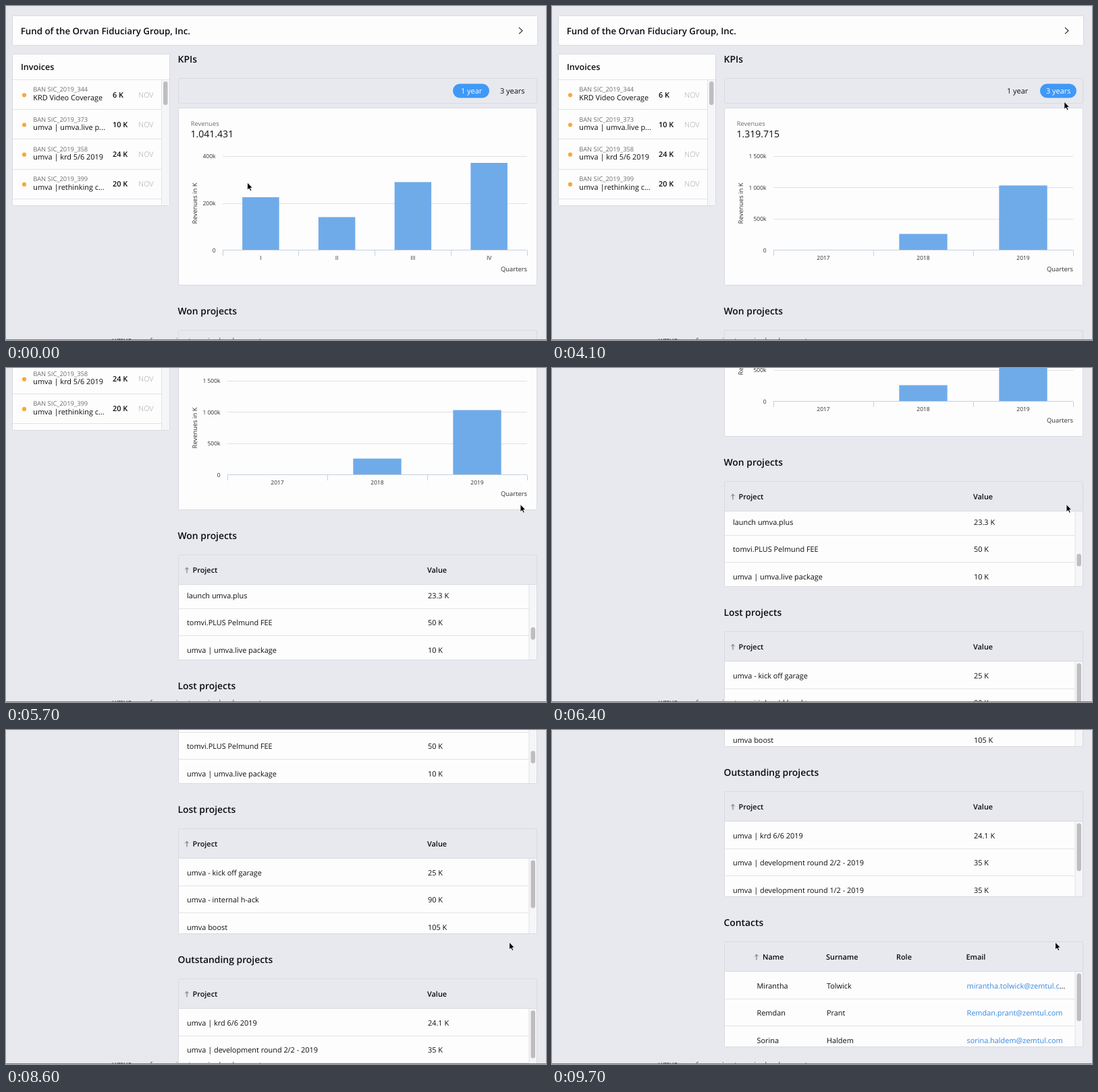
These frames come from a looping animation (800x496 px, 9.8 s). An HTML page:

```html
<!DOCTYPE html>
<html lang="en">
<head>
<meta charset="utf-8">
<title>Account dashboard</title>
<style>
  html, body { margin: 0; width: 100%; height: 100%; overflow: hidden; background: #e8e9ee; }
  #stage { display: block; }
  text { font: 10.9px "Open Sans", sans-serif; fill: #0c0c0f; white-space: pre; text-rendering: geometricPrecision; }
  .title { font-size: 13.3px; font-weight: 600; }
  .heading { font-size: 13.9px; font-weight: 600; }
  .bold { font-weight: 600; }
  .panelTitle { font-size: 12.6px; font-weight: 600; }
  .small { font-size: 9.4px; fill: #6c6d71; }
  .axisTitle { font-size: 9.4px; fill: #2e2f33; }
  .tick { font-size: 8.5px; fill: #2e2f33; }
  .total { font-size: 14px; }
  .month { font-weight: 300; fill: #a2a3a7; }
  .link { fill: #3588dd; }
  .on { fill: #fff; }
  .end { text-anchor: end; }
  .middle { text-anchor: middle; }
</style>
</head>
<body>
<svg id="stage" width="800" height="496" viewBox="0 0 800 496"></svg>
<script>
const LOOP = 9800, SWITCH = 3300, GROW = 800;
const BG = '#e8e9ee', WHITE = '#fefdfe', BORDER = '#d9dadf', BAR = '#6fabe9', AXIS = '#c3d0e0';

const text = (x, y, s, cls = '') => `<text x="${x}" y="${y}" class="${cls}">${s}</text>`;
const rect = (x, y, w, h, fill, extra = '') =>
  `<rect x="${x}" y="${y}" width="${w}" height="${h}" fill="${fill}" ${extra}/>`;
const line = (x1, y1, x2, y2, color = '#e1e2e6') =>
  `<path d="M${x1} ${y1}L${x2} ${y2}" stroke="${color}"/>`;
const panel = (x, y, w, h, fill = WHITE) => rect(x, y, w, h, fill, `rx="2" stroke="${BORDER}"`);
const clip = (x, y, w, h, content) => `<svg x="${x}" y="${y}" width="${w}" height="${h}">${content}</svg>`;
const each = (list, draw) => list.map(draw).join('');
const scrollbar = (x, y, h, thumbY, thumbH) =>
  rect(x, y, 12, h, '#f6f6f9') + line(x + .5, y, x + .5, y + h) +
  rect(x + 3, thumbY, 6.5, thumbH, '#bebdc0', 'rx="3.2"');

function invoices() {
  const rows = [
    ['344', 'KRD Video Coverage', '6 K'],
    ['373', 'umva | umva.live p...', '10 K'],
    ['358', 'umva | krd 5/6 2019', '24 K'],
    ['399', 'umva |rethinking c...', '20 K']
  ];
  return panel(9.5, 71.5, 233, 225) + text(22, 95, 'Invoices', 'panelTitle') + line(10, 109.5, 242, 109.5) +
    each(rows, ([id, name, amount], i) => {
      const y = 110 + 44.2 * i;
      return `<circle cx="27" cy="${y + 22.3}" r="3.1" fill="#f7a93b"/>` +
        text(40.3, y + 17.3, 'BAN SIC_2019_' + id, 'small') + text(40.3, y + 30, name) +
        text(158, y + 25.7, amount, 'bold') + text(196.3, y + 25.7, 'NOV', 'month') +
        line(10, Math.floor(y + 43.6) + .5, 230, Math.floor(y + 43.6) + .5);
    }) + scrollbar(230, 110, 186, 112, 35);
}

function filter(choice) {
  return rect(choice ? 723 : 662, 115.5, 54, 21, '#3f99f7', 'rx="10.5"') +
    text(674, 130, '1 year', choice ? '' : 'on') + text(732, 130, '3 years', choice ? 'on' : '');
}

function chart(left, total, ticks, names, heights, barWidth) {
  const base = 363, right = 772, step = (right - left) / names.length;
  const center = i => left + step * (i + .5);
  return text(273.5, 195.3, total, 'total') +
    each(ticks, (label, i) => {
      const y = base - 140 * i / (ticks.length - 1);
      return (i ? line(left, Math.floor(y) + .5, right, Math.floor(y) + .5, '#dfe0e3') : '') +
        text(left - 10.5, y + 3, label, 'tick end');
    }) +
    '<g class="bars">' + each(heights, (h, i) => rect(center(i) - barWidth / 2, base - h, barWidth, h, BAR)) + '</g>' +
    line(left, base - .5, right, base - .5, AXIS) +
    each([...names, ''], (name, i) => {
      const x = Math.floor(left + step * i) + .5;
      return line(x, base, x, base + 8, AXIS) + text(center(i), 377.3, name, 'tick middle');
    });
}

function table(index, title, columns, rows, arrowX, shift = 0, thumbY = 47.5, thumbH = 71) {
  const top = 481 + 223 * index;
  const cells = each(rows, (row, i) => {
    const y = 40.3 * i - shift;
    const divider = Math.floor(y + 40) + .5;
    return each(row, (cell, c) => cell && text(columns[c][1] - 255, y + 25, cell, cell.includes('@') ? 'link' : '')) +
      line(0, divider, 520, divider);
  });
  return text(254.5, top - 23, title, 'heading') + panel(255.5, top + .5, 531, 156, BG) +
    `<path d="M${arrowX} ${top + 27.5}v-8m-2.7 2.7l2.7 -2.7l2.7 2.7" fill="none" stroke="#55565a" stroke-width=".9"/>` +
    each(columns, ([name, , x]) => text(x, top + 27.3, name, 'bold')) +
    clip(256, top + 45, 530, 111, rect(0, 0, 530, 111, WHITE) + cells) +
    line(256, top + 44.5, 786, top + 44.5, BORDER) +
    scrollbar(774.5, top + 45, 111, top + thumbY, thumbH) +
    `<path d="M786.5 ${top + 1}v155.5H256" fill="none" stroke="${BORDER}"/>`;
}

// Columns: name, left edge of cells, left edge of the header
const projectColumns = [['Project', 267, 276.5], ['Value', 624, 624]];
const contactColumns = [['Name', 302.5, 312], ['Surname', 406, 406], ['Role', 510, 510], ['Email', 613.5, 613.5]];

document.getElementById('stage').innerHTML = rect(0, 0, 800, 496, BG) + '<g id="page">' +
  panel(9.5, 14.5, 778, 44) + text(21.7, 41.6, 'Fund of the Orvan Fiduciary Group, Inc.', 'title') +
  '<path d="M760 32l5 4.7l-5 4.7" fill="none" stroke="#333" stroke-width="1.2"/>' +
  invoices() +
  text(254.5, 84, 'KPIs', 'heading') + panel(255.5, 107.5, 531, 37, BG) + panel(255.5, 151.5, 531, 263) +
  text(273.7, 178.3, 'Revenues', 'small') +
  '<text transform="translate(282.5 293) rotate(-90)" class="axisTitle middle">Revenues in K</text>' +
  text(772, 393.8, 'Quarters', 'axisTitle end') +
  '<g id="oneYear">' + filter(0) +
  chart(321, '1.041.431', ['0', '200k', '400k'], ['I', 'II', 'III', 'IV'], [79, 49.5, 101.5, 130], 54.5) + '</g>' +
  '<g id="threeYears">' + filter(1) +
  chart(328, '1.319.715', ['0', '500k', '1 000k', '1 500k'], ['2017', '2018', '2019'], [0, 24.5, 96.5], 71.3) + '</g>' +
  table(0, 'Won projects', projectColumns, [
    ['launch umva.plus', '23.3 K'], ['tomvi.PLUS Pelmund FEE', '50 K'], ['umva | umva.live package', '10 K']
  ], 268, 5, 108, 18.5) +
  table(1, 'Lost projects', projectColumns, [
    ['umva - kick off garage', '25 K'], ['umva - internal h-ack', '90 K'], ['umva boost', '105 K']
  ], 268) +
  table(2, 'Outstanding projects', projectColumns, [
    ['umva | krd 6/6 2019', '24.1 K'], ['umva | development round 2/2 - 2019', '35 K'],
    ['umva | development round 1/2 - 2019', '35 K']
  ], 268) +
  table(3, 'Contacts', contactColumns, [
    ['Mirantha', 'Tolwick', '', 'mirantha.tolwick@zemtul.c<tspan fill="#0c0c0f">...</tspan>'],
    ['Remdan', 'Prant', '', 'Remdan.prant@zemtul.com'],
    ['Sorina', 'Haldem', '', 'sorina.haldem@zemtul.com']
  ], 303) + '</g>' +
  '<g opacity=".75">' + text(157, 500, 'umva', 'bold') + text(213, 500.5, 'for scoring team in development') +
  text(462, 500.5, 'never') + '</g>' + line(0, 495.5, 800, 495.5, '#77787b') +
  '<path id="cursor" d="M0 0V11.3L2.6 9L4.3 12.8L6.3 12L4.6 8.2H8Z" fill="#000" stroke="#fff" stroke-width=".9"/>';

const [page, oneYear, threeYears, cursor] =
  ['page', 'oneYear', 'threeYears', 'cursor'].map(id => document.getElementById(id));
const growing = threeYears.querySelector('.bars');

const smooth = p => p * p * (3 - 2 * p);
const linear = p => p;

// Keys: time followed by one or more values
function track(keys, t, ease) {
  const next = keys.findIndex(k => k[0] > t);
  if (next === 0) return keys[0].slice(1);
  if (next < 0) return keys[keys.length - 1].slice(1);
  const a = keys[next - 1], b = keys[next], p = ease((t - a[0]) / (b[0] - a[0]));
  return a.slice(1).map((v, i) => v + (b[i + 1] - v) * p);
}

const scrollKeys = [[4700, 0], [5100, 61], [6000, 275], [6400, 313], [7300, 313], [7800, 419],
  [8600, 558], [9550, 836]];
const cursorKeys = [[1000, 357.5, 262], [2500, 771, 132], [2800, 771, 132], [3150, 758, 127], [3900, 758, 127],
  [4600, 762, 202.5], [6600, 762, 202.5], [7250, 745.5, 315]];

function draw(now) {
  const t = now % LOOP;
  const switched = t >= SWITCH;
  const grown = smooth(Math.min(1, Math.max(0, (t - SWITCH) / GROW)));
  oneYear.setAttribute('display', switched ? 'none' : 'inline');
  threeYears.setAttribute('display', switched ? 'inline' : 'none');
  growing.setAttribute('transform', `translate(0 ${363 * (1 - grown)}) scale(1 ${grown})`);
  page.setAttribute('transform', `translate(0 ${-Math.round(track(scrollKeys, t, linear)[0])})`);
  cursor.setAttribute('transform', `translate(${track(cursorKeys, t, smooth)})`);
  requestAnimationFrame(draw);
}
requestAnimationFrame(draw);
</script>
</body>
</html>
```
